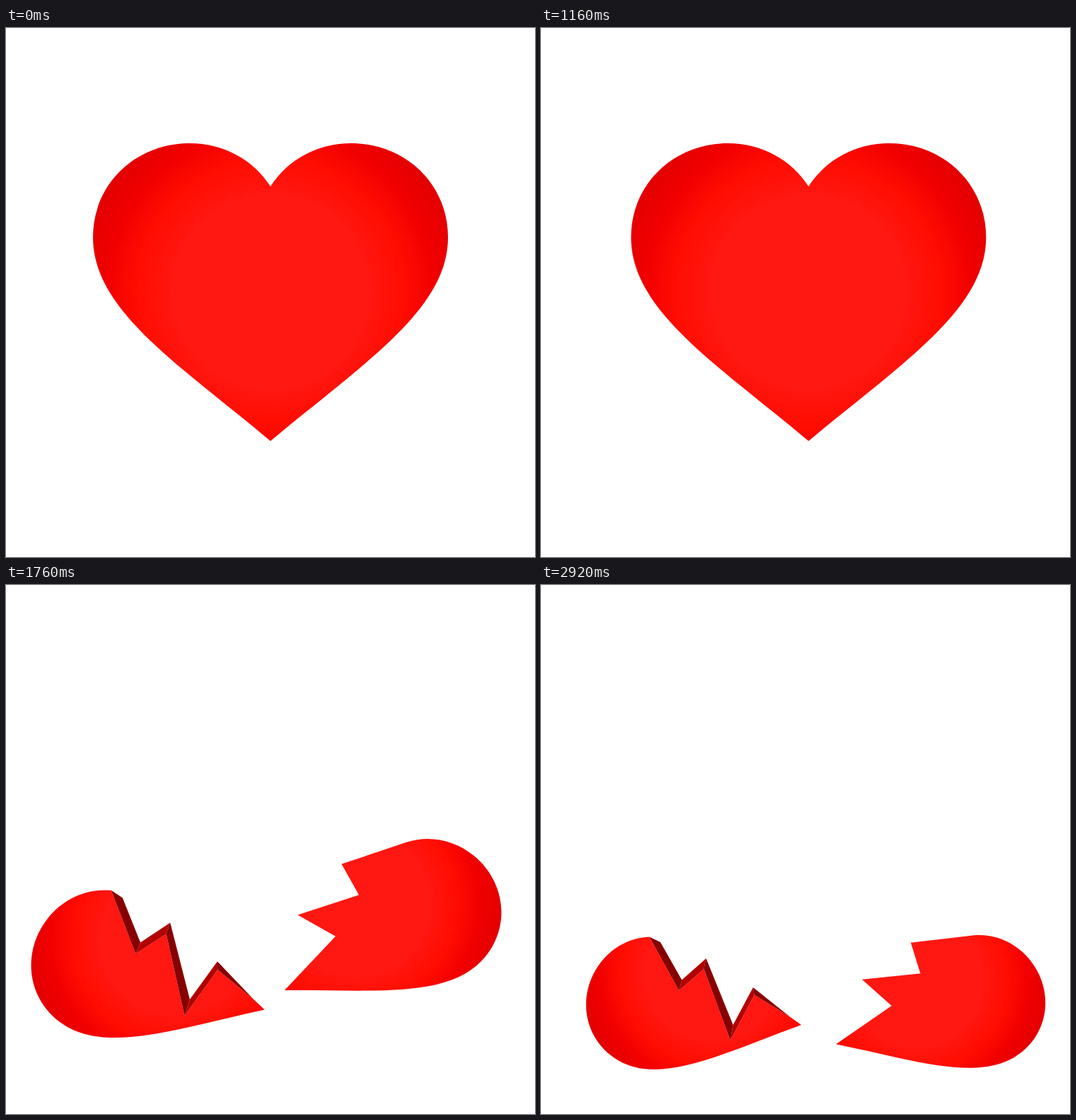
Write an HTML page that moves like this. It is 748x748 px and loops after 3.2 s.

```html
<!DOCTYPE html>
<html lang="en">
<head>
<meta charset="utf-8">
<title>Breaking heart</title>
<style>
  html, body { margin: 0; width: 100%; height: 100%; overflow: hidden; background: #fff; }
  svg { display: block; width: 100vw; height: 100vh; }
</style>
</head>
<body>
<svg viewBox="0 0 748 748">
  <defs>
    <!-- All shapes use the tip of the heart as their origin. -->
    <radialGradient id="red" gradientUnits="userSpaceOnUse" cx="0" cy="-211" r="290">
      <stop offset=".47" stop-color="#ff1711"/>
      <stop offset=".65" stop-color="#ff0d02"/>
      <stop offset=".79" stop-color="#f20000"/>
      <stop offset=".93" stop-color="#e40000"/>
    </radialGradient>
  </defs>
  <path id="whole" fill="url(#red)"/>
  <g id="left">
    <path id="leftFace" fill="url(#red)"/>
    <g id="bevel"></g>
  </g>
  <g id="right"><path id="rightFace" fill="url(#red)"/></g>
</svg>
<script>
const LOOP = 3200, STEP = 40, BREAK = 1200, LAND = 1760, STILL = 2920, DROP = 120;
const LOBE = { x: 113, y: -288, roll: 1.62 };
const $ = id => document.getElementById(id);
const mix = (a, b, u) => a + (b - a) * u;

// Outline of one half, from the notch round the lobe to the tip.
const half = side => {
  const p = (x, y) => `${side * x},${y}`;
  return `M0,-360 C${p(25, -399)} ${p(68, -421)} ${p(114, -421)}` +
    ` C${p(190, -421)} ${p(251, -364)} ${p(251, -288)}` +
    ` C${p(251, -185)} ${p(130, -109)} 0,0`;
};
const lines = points => points.map(p => ' L' + p).join('');

const crackEnd = [2.7, -28];
const front = [[0, -360], [-65, -252], [-1, -230], [-100, -110], [5, -114], crackEnd];
const back = [[2, -335], [-43, -258], [20, -237], [-70, -121], [17, -124], crackEnd];
const rightCrack = [[9.5, -139], [-71, -125], [-6, -227], [-68, -251]];

$('whole').setAttribute('d', half(-1) + ' Z ' + half(1) + ' Z');
$('leftFace').setAttribute('d', half(-1) + lines(front.slice(1).reverse()) + ' Z');
$('rightFace').setAttribute('d', half(1) + lines(rightCrack) + ' Z');

for (let i = 0; i < front.length - 1; i++) {
  const facet = document.createElementNS('http://www.w3.org/2000/svg', 'polygon');
  facet.setAttribute('points', [front[i], back[i], back[i + 1], front[i + 1]].join(' '));
  facet.setAttribute('fill', i % 2 ? '#b20000' : '#860000');
  $('bevel').append(facet);
}

// Each piece tips over to "land", then rocks until it lies at "rest".
const pieces = [
  {
    id: 'left', side: -1, gain: 2.3, swing: 14, period: 632,
    land: { tipX: 366, tipY: 599, turn: 52.5, scale: .763 },
    rest: { x: 157, y: 589.8, turn: 59.9, scale: .69 }
  },
  {
    id: 'right', side: 1, gain: 1.84, swing: 21.7, period: 593,
    land: { tipX: 395, tipY: 575, turn: 38.9, scale: .753 },
    rest: { x: 620, y: 587, turn: 51.5, scale: .686 }
  }
];

// Poses give the lobe centre, the outward turn in degrees and the scale.
function fall({ side, gain, land }, p) {
  const turn = land.turn * p ** gain;
  const scale = mix(1, land.scale, p ** 3.8);
  const cos = Math.cos(turn * Math.PI / 180), sin = Math.sin(turn * Math.PI / 180);
  return {
    x: mix(374, land.tipX, p ** 3) + side * scale * (LOBE.x * cos - LOBE.y * sin),
    y: mix(584, land.tipY, p ** 3) + scale * (LOBE.x * sin + LOBE.y * cos),
    turn, scale
  };
}

function rock(piece, t) {
  const { side, swing, period, rest } = piece;
  const landed = fall(piece, 1);
  const time = Math.min(t, STILL) - LAND;
  const fade = (1 - time / (STILL - LAND)) ** 1.6;
  const tilt = swing * fade * Math.cos(2 * Math.PI * time / period - 2.16);
  const drop = Math.min(1, time / DROP);
  return {
    x: mix(landed.x, rest.x + side * LOBE.roll * tilt, drop),
    y: mix(landed.y, rest.y, drop),
    turn: rest.turn + tilt,
    scale: mix(landed.scale, rest.scale, drop)
  };
}

function place(piece, t) {
  const pose = t < LAND ? fall(piece, (t - BREAK) / (LAND - BREAK)) : rock(piece, t);
  $(piece.id).setAttribute('transform',
    `translate(${pose.x} ${pose.y}) rotate(${piece.side * pose.turn}) ` +
    `scale(${pose.scale}) translate(${-piece.side * LOBE.x} ${-LOBE.y})`);
}

// Sideways shake that loses half its strength with every swing.
function shake(t) {
  const swings = Math.max(0, (t - 60) / 400);
  return -20.5 * .46 ** Math.floor(swings) * Math.sin(2 * Math.PI * swings);
}

function draw(t) {
  const broken = t >= BREAK;
  $('whole').style.display = broken ? 'none' : '';
  for (const { id } of pieces) $(id).style.display = broken ? '' : 'none';
  if (broken) pieces.forEach(piece => place(piece, t));
  else $('whole').setAttribute('transform', `translate(${374 + shake(t)} 584)`);
}

const start = performance.now();
function tick() {
  const t = (performance.now() - start) % LOOP;
  draw(Math.floor(t / STEP) * STEP);
  requestAnimationFrame(tick);
}
tick();
</script>
</body>
</html>
```
